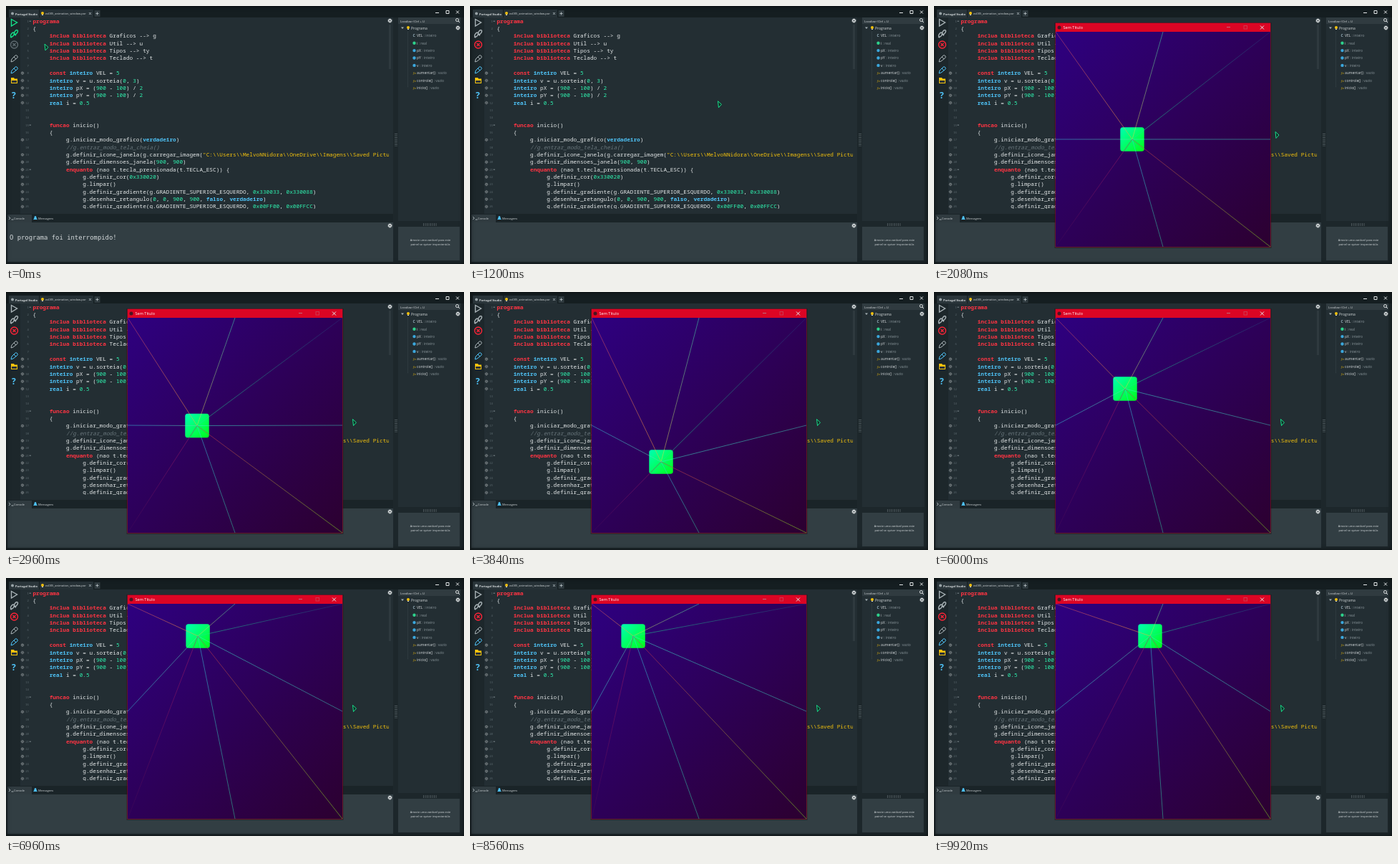
These frames come from a looping animation (640 by 360 pixels, 10 s). An HTML page:

```html
<!DOCTYPE html>
<html lang="pt">
<head>
<meta charset="utf-8">
<style>
html, body { margin: 0; width: 100%; height: 100%; overflow: hidden; background: #1b2529; }
svg { display: block; }
body::after { content: ""; position: fixed; inset: 0; box-shadow: inset 0 0 6px #000a; }
text { font-family: "Open Sans", sans-serif; font-size: 5px; fill: #d5dadc; white-space: pre; }
#code text { font: 7.77px "Noto Sans Mono", monospace; fill: #e4e8e9; }
#code .key { fill: #ff3443; font-weight: 600; }
#code .type { fill: #4fc3f7; font-weight: 600; }
#code .value { fill: #2ff0ae; font-weight: 500; }
#code .string { fill: #f4c20d; }
#code .note { fill: #68757b; font-style: italic; }
#gutter text { font: 4px "Noto Sans Mono", monospace; fill: #5d6a70; text-anchor: end; }
#message { font: 8.9px "DejaVu Sans Mono", monospace; }
.line { fill: none; stroke: #a9b3b7; }
.bold { stroke-width: 1.4; }
.bright { stroke: #e4e8e9; }
.dim { fill: #89959a; }
.small { font-size: 4.2px; }
</style>
</head>
<body>
<svg width="640" height="360" viewBox="0 0 640 360">
  <defs>
    <clipPath id="editor"><rect x="34" y="16" width="501" height="267"/></clipPath>
    <clipPath id="stage"><rect x="170" y="36" width="300" height="300"/></clipPath>
    <linearGradient id="night" x2="1" y2="1"><stop stop-color="#2e0080"/><stop offset="1" stop-color="#2c0030"/></linearGradient>
    <linearGradient id="mint" x2="1" y2="1"><stop stop-color="#00ffb4"/><stop offset="1" stop-color="#00ff18"/></linearGradient>
    <g id="gear" class="line bright"><circle r="1.700" class="bold"/><circle r="2.600" stroke-dasharray="1 1.040"/></g>
    <g id="bulb"><circle r="2" cy="-.6" fill="#f4c20d"/><path d="M-1 2h2" stroke="#d5dadc"/></g>
    <path id="pencil" d="M-4 4l1-4 5-5q2-1 3 1t-1 3l-5 4zM0-3l3 3"/>
  </defs>

  <rect width="640" height="360" fill="#1d272b"/>
  <rect width="640" height="16" fill="#151e21"/>
  <rect x="4" y="5" width="42" height="11" fill="#2b363b"/>
  <rect x="47" y="5" width="75" height="11" fill="#263136"/>
  <rect x="123.500" y="6" width="8" height="9" fill="#2f3a3f"/>
  <rect x="20" y="16" width="521" height="274" fill="#232e33"/>
  <rect x="548" y="16" width="87" height="284" fill="#232e33"/>
  <rect y="290" width="541" height="12" fill="#1a2428"/>
  <rect x="2" y="291" width="34" height="11" fill="#303b40"/>
  <rect x="2" y="302" width="539" height="55" fill="#323e43"/>
  <rect x="548" y="308" width="86" height="47" fill="#323e43"/>

  <circle cx="9" cy="10.500" r="2" fill="#9aa5a9"/>
  <text x="13" y="12.500" font-weight="bold" style="font-size:4px">Portugol Studio</text>
  <use href="#bulb" x="51" y="10.500"/>
  <text x="55" y="12.300" style="font-size:4.100px">ex005_animation_window.por</text>
  <path class="line" d="M116 9l3 3m0-3l-3 3M125.500 10.500h4m-2-2v4"/>
  <path class="line bright" d="M600 9.500h5M615 6.500h4v4h-4zM629 6.500l4 4m0-4l-4 4"/>

  <path id="play" class="line bold" d="M7.500 18.500L15.500 23L7.500 28z"/>
  <g id="steps" class="line bold"><ellipse cx="9" cy="40" rx="1.800" ry="3.300" transform="rotate(35 9 40)"/><ellipse cx="14" cy="36.500" rx="1.800" ry="3.300" transform="rotate(35 14 36.500)"/><path d="M6 43l2 1m4-4l2 1"/></g>
  <g id="stop" class="line bold"><circle cx="11.500" cy="54" r="5"/><path d="M9.500 52l4 4m0-4l-4 4"/></g>
  <use href="#pencil" class="line" x="11" y="74"/>
  <use href="#pencil" class="line" x="11" y="90" style="stroke:#4fc3f7"/>
  <path d="M7 100h4l1 1.500h4v6.500H7z" fill="#f4c20d"/><path d="M8 104h7v3H8z" fill="#273238"/>
  <text x="8" y="128.500" style="font-size:12px;font-weight:bold;fill:#4fc3f7">?</text>

  <g id="gutter"></g>
  <g id="code" clip-path="url(#editor)"></g>

  <use href="#gear" x="536.500" y="20.500"/>
  <rect x="535" y="26" width="3" height="62" fill="#2e393e"/>
  <path d="M544 178v18m2-18v18" stroke="#7c888d" stroke-dasharray="1 1.500"/>
  <rect x="548" y="16" width="87" height="9" fill="#303b40"/>
  <text x="551" y="22.500" class="small">Localizar (Ctrl + L)</text>
  <path d="M632.500 19.500a2 2 0 1 0-4 0a2 2 0 1 0 4 0M632 21l2 2" class="line bright"/>
  <path d="M552 29.500h4l-2 2.500z" fill="#aab4b8"/>
  <use href="#bulb" x="562" y="30.500"/>
  <text x="566" y="32.500">Programa</text>
  <use href="#gear" x="631.500" y="30.500"/>
  <path d="M561.500 36v78" stroke="#39454a" stroke-dasharray="1 1"/>
  <g id="symbols"></g>

  <path d="M4 294l2 2-2 2m3.500 0h3" class="line"/>
  <text x="11" y="298" style="font-size:4px">Console</text>
  <path d="M38 298q1.500-1 1.500-3t1.500-2 1.500 2 1.500 3z" fill="#4fc3f7"/>
  <text x="45" y="298" style="font-size:4px">Mensagens</text>
  <use href="#gear" x="536.500" y="306.500"/>
  <path d="M583 304h20m-20 2h20" stroke="#7c888d" stroke-dasharray="1 1.500"/>
  <g text-anchor="middle"><text x="593" y="328" style="font-size:4px">Arraste uma variável para este</text><text x="593" y="333.500" style="font-size:4px">painel se quiser inspecioná-la</text></g>
  <text id="message" x="5" y="326">O programa foi interrompido!</text>

  <g id="window">
    <rect x="168.500" y="23" width="303" height="315" fill="#000" opacity=".3"/>
    <rect x="169.500" y="23.500" width="301" height="313" fill="#a80a26"/>
    <rect x="170" y="24" width="300" height="12" fill="#dc0524"/>
    <circle cx="175" cy="30" r="2.500" fill="#4a1420"/>
    <text x="180.500" y="32" style="font-size:5.600px;fill:#fff">Sem Título</text>
    <path d="M409 29.500h5" class="line" stroke-opacity=".6"/>
    <path d="M456 27.500l5 5m0-5l-5 5" class="line bright"/>
    <rect x="433" y="27.500" width="4.500" height="4.500" class="line" stroke-opacity=".3"/>
    <rect x="170" y="36" width="300" height="300" fill="url(#night)"/>
    <g clip-path="url(#stage)">
      <rect id="box" width="33.400" height="33.400" rx="3.500" fill="url(#mint)"/>
      <g id="rays" stroke-width=".8" opacity=".65"></g>
    </g>
  </g>
  <path id="cursor" d="M0 0L5 4.500L1 9z" fill="#122a25" stroke="#16e08a"/>
</svg>

<script>
const $ = id => document.getElementById(id);

const source = String.raw`programa
{
	inclua biblioteca Graficos --> g
	inclua biblioteca Util --> u
	inclua biblioteca Tipos --> ty
	inclua biblioteca Teclado --> t

	const inteiro VEL = 5
	inteiro v = u.sorteia(0, 3)
	inteiro pX = (900 - 100) / 2
	inteiro pY = (900 - 100) / 2
	real i = 0.5


	funcao inicio()
	{
		g.iniciar_modo_grafico(verdadeiro)
		//g.entrar_modo_tela_cheia()
		g.definir_icone_janela(g.carregar_imagem("C:\\Users\\MelvoNNidora\\OneDrive\\Imagens\\Saved Pictures
		g.definir_dimensoes_janela(900, 900)
		enquanto (nao t.tecla_pressionada(t.TECLA_ESC)) {
			g.definir_cor(0x330020)
			g.limpar()
			g.definir_gradiente(g.GRADIENTE_SUPERIOR_ESQUERDO, 0x330033, 0x330088)
			g.desenhar_retangulo(0, 0, 900, 900, falso, verdadeiro)
			g.definir_gradiente(g.GRADIENTE_SUPERIOR_ESQUERDO, 0x00FF00, 0x00FFCC)`;

const syntax = /(\/\/.*)|("[^"]*)|\b(programa|inclua|biblioteca|const|funcao|enquanto)\b|\b(inteiro|real|verdadeiro|falso)\b|\b(0x\w+|\d+(?:\.\d+)?)\b/g;
const classes = ["note", "string", "key", "type", "value"];
const highlight = line => line.replace(syntax, (word, ...groups) =>
  `<tspan class="${classes[groups.slice(0, 5).findIndex(Boolean)]}">${word}</tspan>`);

source.split("\n").forEach((line, row) => {
  const y = 23.7 + row * 10.35, code = line.trimStart();
  const x = 37.4 + (line.length - code.length) * 23.3;
  $("code").innerHTML += `<text x="${x}" y="${y}">${highlight(code)}</text>`;
  $("gutter").innerHTML += `<text x="32" y="${y - 1}">${row + 1}</text>`;
  if ((row > 6 && row < 12) || row === 16 || row > 17)
    $("gutter").innerHTML += `<use href="#gear" transform="translate(23 ${y - 2.5}) scale(.75)" opacity=".45"/>`;
  if ([0, 14, 20].includes(row))
    $("gutter").innerHTML += `<path d="M32.500 ${y - 2.5}h2.500" stroke="#7c888d"/>`;
});

["VEL : inteiro", "i : real", "pX : inteiro", "pY : inteiro", "v : inteiro",
 "aumentar() : vazio", "controle() : vazio", "inicio() : vazio"].forEach((label, n) => {
  const y = 41.3 + n * 10.4, [name, type] = label.split(" : ");
  const icon = n > 4 ? `<text x="568.500" y="${y + 1.8}" class="small" style="fill:#f4c20d;font-style:italic">ƒx</text>`
    : n ? `<circle cx="570.500" cy="${y}" r="2.200" fill="${n === 1 ? "#2ed18c" : "#3ba7dc"}"/>`
    : `<text x="568.500" y="${y + 2}" style="font-weight:bold;fill:#9fb7c4">C</text>`;
  $("symbols").innerHTML += `${icon}<text x="574" y="${y + 1.8}">${name} <tspan class="dim">: ${type}</tspan></text>`;
});

// Ray end point, colour there, colour at the box
const rays = [
  [170, 36, "#d0406a", "#ffb13c"], [320, 36, "#3fe0b0", "#e8d050"], [470, 36, "#2b2a78", "#20e890"],
  [170, 186, "#38c8dc", "#60d8b0"], [470, 186, "#40c8b8", "#40e8c8"],
  [170, 336, "#3c0a58", "#b02068"], [320, 336, "#34d09c", "#38c8e0"], [470, 336, "#8cf024", "#d02850"]
].map(([x, y, outer, inner], n) => {
  $("rays").innerHTML += `<linearGradient id="ray${n}" gradientUnits="userSpaceOnUse" x1="${x}" y1="${y}">
    <stop stop-color="${outer}"/><stop offset="1" stop-color="${inner}"/></linearGradient>
    <path id="line${n}" stroke="url(#ray${n})"/>`;
  return { x, y, n };
});

const LOOP = 10000, STEP = 80, RUN = 560, OPEN = 1240, START = 1331, SPEED = 0.0574;
const route = [[320, 186], [267, 186], [267, 166], [267, 248], [267, 81], [294, 81], [226, 81], [320, 81]];
const mouse = [[0, 54, 53], [400, 11, 23], [640, 11, 23], [1500, 477, 175.5], [2080, 477, 175.5], [2480, 484.5, 177.5], [LOOP, 484.5, 177.5]];

function boxAt(time) {
  let left = Math.max(0, time - START) * SPEED;
  for (let i = 1; i < route.length; i++) {
    const [x, y] = route[i - 1], dx = route[i][0] - x, dy = route[i][1] - y;
    const length = Math.hypot(dx, dy);
    if (left <= length) return [x + dx * left / length, y + dy * left / length];
    left -= length;
  }
  return route.at(-1);
}

function mouseAt(time) {
  const i = mouse.findIndex(point => point[0] > time);
  const [t0, x0, y0] = mouse[i - 1], [t1, x1, y1] = mouse[i];
  const p = (time - t0) / (t1 - t0), e = p * p * (3 - 2 * p);
  return [x0 + (x1 - x0) * e, y0 + (y1 - y0) * e];
}

function draw(now) {
  const time = Math.floor(now % LOOP / STEP) * STEP;
  const running = time >= RUN, [x, y] = boxAt(time);
  $("play").style.stroke = $("steps").style.stroke = running ? "#a9b3b7" : "#16e08a";
  $("stop").style.stroke = running ? "#ff2438" : "#5f6b70";
  $("message").style.display = running ? "none" : "";
  $("window").style.display = time >= OPEN ? "" : "none";
  $("box").setAttribute("transform", `translate(${x - 16.7} ${y - 16.7})`);
  for (const ray of rays) {
    $("line" + ray.n).setAttribute("d", `M${ray.x} ${ray.y}L${x} ${y}`);
    $("ray" + ray.n).setAttribute("x2", x);
    $("ray" + ray.n).setAttribute("y2", y);
  }
  $("cursor").setAttribute("transform", `translate(${mouseAt(time)})`);
  requestAnimationFrame(draw);
}
requestAnimationFrame(draw);
</script>
</body>
</html>
```
